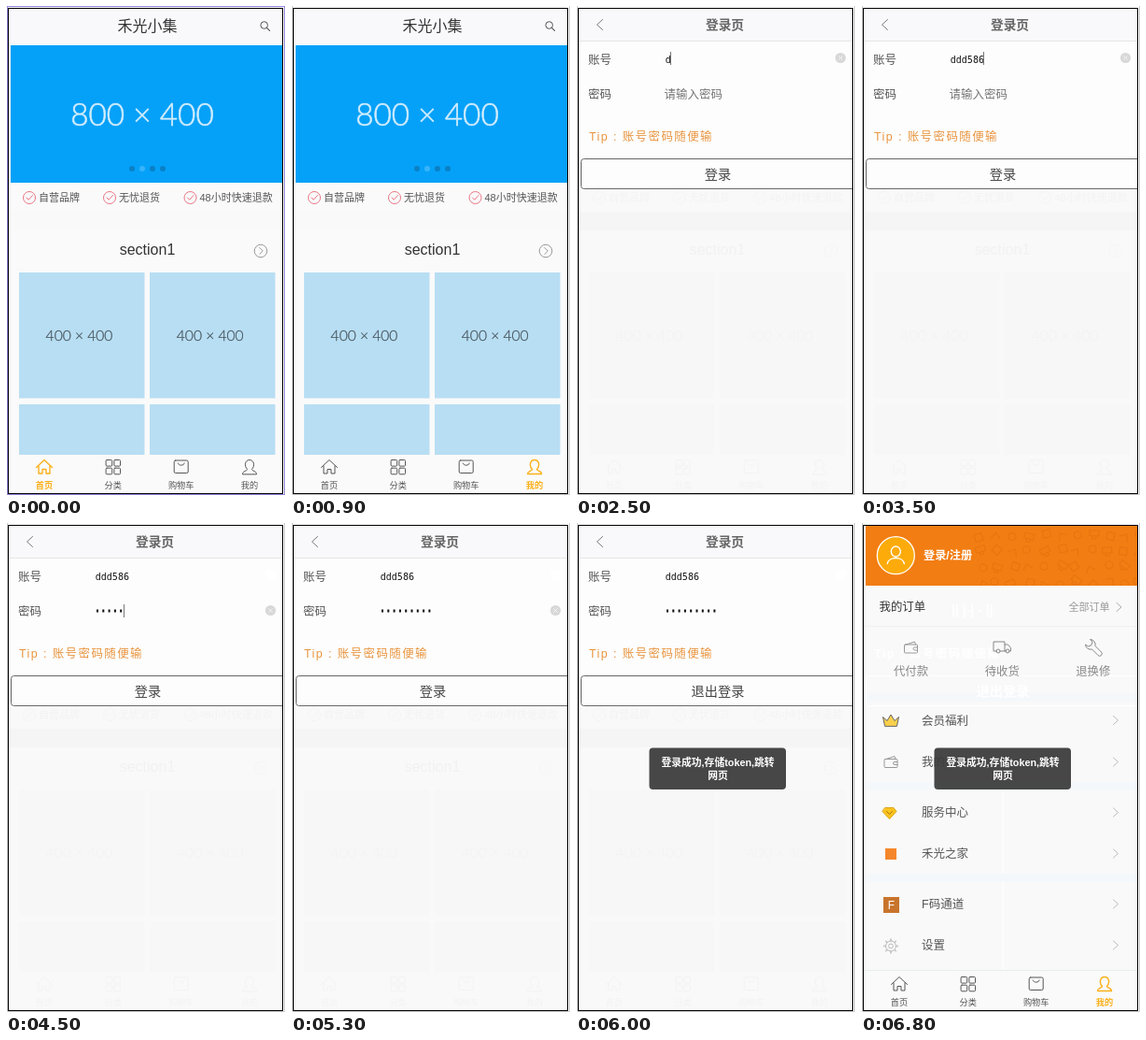
An HTML page for the animation above (8 s loop, 299 by 523 pixels).

```html
<!DOCTYPE html>
<html lang="zh-CN">
<head>
<meta charset="utf-8">
<title>商城登录</title>
<style>
html, body { margin: 0; width: 100%; height: 100%; overflow: hidden; background: #fff; }
svg { display: block; width: 299px; height: 523px; }
text { font-family: "Liberation Sans", "Noto Sans CJK SC", "Noto Sans CJK", sans-serif; white-space: pre; }
.mid { text-anchor: middle; }
.lato { font-family: Lato, sans-serif; font-weight: 300; }
.mono { font-family: "DejaVu Sans Mono", monospace; }
.bold { font-weight: 700; }
.line { fill: none; stroke-linecap: round; stroke-linejoin: round; }
</style>
</head>
<body>
<svg id="stage" viewBox="0 0 299 523" xmlns="http://www.w3.org/2000/svg">
  <defs>
    <clipPath id="screen"><rect x="3" y="3" width="294" height="519"/></clipPath>
    <clipPath id="lower"><rect x="3" y="197" width="294" height="325"/></clipPath>
    <clipPath id="top"><rect x="5" y="3" width="291" height="64"/></clipPath>
    <g id="homeGhost"></g>
    <g id="tabsGhost" color="#555"></g>
  </defs>
  <rect width="299" height="523" fill="#fff"/>
  <path d="M1.5 0V522.5H298.5V0" fill="none" stroke="#c8c8c8"/>
  <rect id="glow" x="1.5" y=".5" width="297" height="522" fill="none" stroke="#9186da"/>
  <g clip-path="url(#screen)">
    <g id="home"></g>
    <g id="login"></g>
    <g id="mine"></g>
    <g id="tabs"></g>
    <g id="toast"></g>
  </g>
  <rect x="2.5" y="2.5" width="294" height="519" fill="none" stroke="#000"/>
</svg>
<script>
const $ = id => document.getElementById(id);
const show = (id, on) => $(id).setAttribute('display', on ? 'inline' : 'none');

// y is the vertical middle of the line
const text = (x, y, size, color, str, cls = '', extra = '') =>
  `<text x="${x}" y="${y + size * 0.37}" font-size="${size}" fill="${color}" class="${cls}" ${extra}>${str}</text>`;
const rect = (x, y, w, h, fill, extra = '') =>
  `<rect x="${x}" y="${y}" width="${w}" height="${h}" fill="${fill}" ${extra}/>`;
const circle = (x, y, r, fill, extra = '') =>
  `<circle cx="${x}" cy="${y}" r="${r}" fill="${fill}" ${extra}/>`;
const path = (x, y, d, color, width = 1, extra = '') =>
  `<path transform="translate(${x} ${y})" d="${d}" class="line" stroke="${color}" stroke-width="${width}" ${extra}/>`;

const RIGHT = 'M-2.5 -4.5L2.5 0L-2.5 4.5';
const PERSON = 'M-7.5 7.5C-7.5 4 -2.5 4.5 -2.5 2.5C-6 -1 -5 -7.5 0 -7.5S6 -1 2.5 2.5C2.5 4.5 7.5 4 7.5 7.5Z';
const WALLET = 'M-6 -3H6Q7 -3 7 -2V5Q7 6 6 6H-6Q-7 6 -7 5V-2Q-7 -3 -6 -3ZM-5 -3L4 -6L5 -3M7 0H4A1.5 1.5 0 0 0 4 3H7';

function buildHome() {
  const check = (x, label) =>
    circle(x, 205, 6.5, 'none', 'stroke="#ea7583"') +
    path(x, 205, 'M-3 0L-0.8 2.3L3.5 -2.5', '#ea7583') +
    text(x + 10, 205, 11, '#555', label);
  const card = (x, y, h) => rect(x, y, 134.5, h, '#b8def3');
  const size = (x, y, px, color, str) =>
    text(x, y, px, color, str, 'lato mid', `stroke="${color}" stroke-width="${px * 0.018}"`);
  return rect(3, 3, 294, 519, '#fafafa') +
    rect(3, 3, 294, 38, '#f9f8fa') +
    text(151.5, 21, 16, '#333', '禾光小集', 'mid') +
    circle(276.7, 20.5, 3.8, 'none', 'stroke="#555"') +
    path(279.5, 23.3, 'M0 0L3 3', '#555', 1.2) +
    rect(5, 42, 291, 147, '#05a1f8') +
    size(146, 115.5, 33.4, '#d3edfd', '800 × 400') +
    [0, 1, 2, 3].map(i => circle(135 + 11 * i, 174, 3, i === 1 ? '#37b4fb' : '#0a80c6')).join('') +
    check(25, '自营品牌') + check(111, '无忧退货') + check(197.5, '48小时快速退款') +
    rect(3, 220, 294, 20, '#f9f9f9') +
    text(151.5, 260, 16, '#333', 'section1', 'mid') +
    circle(273, 262, 6.8, 'none', 'stroke="#999"') +
    path(273.5, 262, 'M-1.7 -3.5L1.8 0L-1.7 3.5', '#999') +
    card(14, 285, 134.5) + card(154, 285, 134.5) +
    size(78.5, 352.5, 15.6, '#46545d', '400 × 400') + size(218.7, 352.5, 15.6, '#46545d', '400 × 400') +
    card(14, 426, 54) + card(154, 426, 54);
}

function buildTabs(prefix) {
  const box = (x, y) => `M${x} ${y}h4.6q1 0 1 1v4.6q0 1 -1 1h-4.6q-1 0 -1 -1v-4.6q0 -1 1 -1Z`;
  const items = [
    ['首页', 41, 'M-8.5 0.5L0 -7.5L8.5 0.5M-6 -1V7H-2V2.5H2V7H6V-1'],
    ['分类', 114.7, box(-6.6, -7.5) + box(2.2, -7.5) + box(-6.6, 1.2) + box(2.2, 1.2)],
    ['购物车', 187.7, 'M-6 -7H6Q7.5 -7 7.5 -5.5V5Q7.5 6.5 6 6.5H-6Q-7.5 6.5 -7.5 5V-5.5Q-7.5 -7 -6 -7ZM-3.5 -4C-3 -1 3 -1 3.5 -4'],
    ['我的', 261, PERSON]
  ];
  return rect(3, 480, 294, 43, '#fafafa') +
    items.map(([label, x, d], i) => `<g id="${prefix}${i}">` +
      path(x, 493, d, 'currentColor') +
      text(x, 513, 9.2, 'currentColor', label, 'mid') + '</g>').join('');
}

function buildLogin() {
  const clear = (id, y) => `<g id="${id}">` + circle(283.5, y, 5.6, '#d8d8d8') +
    path(283.5, y, 'M-1.8 -1.8L1.8 1.8M1.8 -1.8L-1.8 1.8', '#f4f4f4') + '</g>';
  return rect(3, 3, 294, 519, '#f9f9f9') +
    '<g clip-path="url(#lower)" opacity=".03" style="filter:grayscale(1)">' +
    '<use href="#homeGhost"/><use href="#tabsGhost"/></g>' +
    rect(3, 220, 294, 20, '#f5f5f5') +
    rect(3, 38, 294, 159, '#fdfdfd') +
    rect(3, 3, 294, 34, '#f9f8fa') + rect(3, 37, 294, 1, '#e6e6e6') +
    path(25.5, 20, 'M3 -5.5L-3 0L3 5.5', '#777') +
    text(159.5, 20, 13.7, '#666', '登录页', 'mid bold') +
    text(13, 57, 12.5, '#555', '账号') + text(13, 94, 12.5, '#555', '密码') +
    text(94.5, 57, 12.5, '#757575', '请输入账号', '', 'id="userHint"') +
    text(94.5, 94, 12.5, '#757575', '请输入密码', '', 'id="passHint"') +
    text(95.8, 57.3, 10, '#111', '', 'mono', 'id="user"') +
    '<g id="dots"></g>' + rect(95, 49, 1, 14, '#777', 'id="caret"') +
    clear('clearUser', 55.5) + clear('clearPass', 93.5) +
    circle(284, 55.5, 6, '#fff', 'id="cleared"') +
    text(14, 139, 12.5, '#e8943e', 'Tip : 账号密码随便输', '', 'letter-spacing="1.4"') +
    rect(5.5, 163.5, 296, 32, '#fdfdfd', 'id="button" rx="3" stroke="#666"') +
    text(152, 180, 14.2, '#444', '登录', 'mid', 'id="action"');
}

function buildMine() {
  let seed = 7;
  const rnd = () => (seed = seed * 16807 % 2147483647) / 2147483647;
  const shapes = ['M-4 -4H4V4H-4Z', 'M-5 2L0 -4L5 2', 'M-4 0A4 4 0 1 0 4 0A4 4 0 1 0 -4 0', 'M-5 -3H5V3H-5ZM-2 3V6H2V3'];
  let pattern = '';
  for (let i = 0; i < 44; i++) {
    const x = 126 + (i % 11) * 17 + rnd() * 6, y = 10 + Math.floor(i / 11) * 17 + rnd() * 6;
    pattern += `<g transform="rotate(${Math.round(rnd() * 90 - 45)} ${x} ${y})">` +
      path(x, y, shapes[i % 4], '#dc6c0d', 1, 'opacity=".5"') + '</g>';
  }
  const order = (x, label, icon) => icon + text(x, 158.5, 12.4, '#888', label, 'mid');
  const row = (y, label, icon) => icon + text(65, y, 12.5, '#555', label) + path(273, y, RIGHT, '#bbb');
  const gap = y => rect(3, y, 294, 9, '#f4f8fb');
  const gear = Array.from({ length: 8 }, (_, i) => {
    const a = i * Math.PI / 4, c = Math.cos(a), s = Math.sin(a);
    return `M${c * 5.5} ${s * 5.5}L${c * 7.3} ${s * 7.3}`;
  }).join('');
  return rect(3, 3, 294, 519, '#f9f9f9') +
    rect(5, 3, 291, 64, '#f27d12') + `<g clip-path="url(#top)">${pattern}</g>` +
    circle(37.3, 34.7, 20, '#fcab0b', 'stroke="#fff" stroke-width="1.3"') +
    path(37.3, 34.5, 'M-9 9C-8 1 8 1 9 9M-5 -4A5 5.5 0 1 0 5 -4A5 5.5 0 1 0 -5 -4', '#fff', 1.4) +
    text(67, 34.5, 12.2, '#fff', '登录/注册', 'bold') +
    text(19.5, 89.5, 12.4, '#333', '我的订单') +
    text(222.5, 90, 11, '#999', '全部订单') + path(276.5, 90, RIGHT, '#aaa') +
    rect(3, 110, 294, 1, '#f0f0f0') +
    gap(182) + gap(277) + gap(375) +
    // faint remains of the login page underneath
    text(14, 139, 12.5, '#fff', 'Tip : 账号密码随便输', 'bold', 'letter-spacing="1.4"') +
    text(97, 93, 14, '#fff', '|| |-| - ||', 'bold') +
    rect(5.5, 163.5, 296, 32, 'none', 'rx="3" stroke="#fff"') +
    text(152, 180, 14.2, '#fff', '退出登录', 'mid bold') +
    order(53.5, '代付款', path(53.5, 133, WALLET, '#999')) +
    order(151.3, '待收货', path(151, 133, 'M-6 4H-9V-6H3V4H-2M3 -3H6.5L9.5 0.5V4H8M3 4H4M-6 4A2 2 0 1 0 -2 4A2 2 0 1 0 -6 4M4 4A2 2 0 1 0 8 4A2 2 0 1 0 4 4', '#888')) +
    order(248.8, '退换修', path(249, 133, 'M-3 -8.5A5.5 5.5 0 0 1 2 -1.5L8.5 5A2.4 2.4 0 0 1 5 8.5L-1.5 2A5.5 5.5 0 0 1 -8.5 -3L-5.5 -1L-2.2 -2.2L-1 -5.5Z', '#888')) +
    rect(151, 286, 2, 89, '#fdfdfd') + rect(151, 384, 2, 94, '#fdfdfd') +
    row(211, '会员福利', path(32, 211, 'M-6.5 6L-8.5 -3.5L-4 0.5L0 -6L4 0.5L8.5 -3.5L6.5 6Z', '#666', 1, 'style="fill:#f9d04c"')) +
    row(255.5, '我的优惠', path(32, 255.5, WALLET, '#999')) +
    row(309.5, '服务中心', path(30.5, 310, 'M-4.5 -5.5H4.5L7.5 -1.5L0 6.5L-7.5 -1.5Z', '#dba51c', 1, 'style="fill:#fbc31e"') +
      path(30.5, 310, 'M-3 -1.5L0 1.5L3 -1.5', '#a9750c')) +
    row(353.5, '禾光之家', rect(26, 348, 12, 12, '#f5872b')) +
    row(407.5, 'F码通道', rect(24, 400, 17, 17, '#c8742c') + text(32.5, 408.5, 12, '#fff', 'F', 'mid')) +
    row(451.5, '设置', path(32, 452.5, gear, '#ccc', 2) + circle(32, 452.5, 5.4, '#f9f9f9', 'stroke="#bbb"') +
      circle(32, 452.5, 2.4, 'none', 'stroke="#bbb"')) +
    rect(3, 478, 294, 1, '#e9edf0');
}

function buildToast() {
  return rect(78.5, 240.5, 146.5, 44.5, '#3c3c3c', 'rx="4" opacity=".94"') +
    text(152, 256, 10.8, '#fff', '登录成功,存储token,跳转', 'mid bold') +
    text(152, 270, 10.8, '#fff', '网页', 'mid bold');
}

$('home').innerHTML = $('homeGhost').innerHTML = buildHome();
$('tabs').innerHTML = buildTabs('tab');
$('tabsGhost').innerHTML = buildTabs('ghost');
$('mine').innerHTML = buildMine();
$('login').innerHTML = buildLogin();
$('toast').innerHTML = buildToast();

const LOOP = 8000;
const USER = 'ddd586';
const userKeys = [2500, 2700, 2800, 3000, 3300, 3500];
const passKeys = [4100, 4200, 4400, 4500, 4500, 4700, 4700, 4800, 4800];
const typed = (keys, t) => keys.filter(k => t >= k).length;

function drawForm(t) {
  const n = typed(userKeys, t), m = typed(passKeys, t);
  const inPass = t >= 3800;
  show('userHint', !n);
  show('passHint', !m);
  $('user').textContent = USER.slice(0, n);
  $('dots').innerHTML = Array.from({ length: m }, (_, i) => rect(97 + 6.3 * i, 92.5, 2, 3, '#111')).join('');
  show('clearUser', n && !inPass);
  show('cleared', inPass);
  show('clearPass', m && t < 5800);
  show('caret', t >= 2000 && t < 5300);
  $('caret').setAttribute('x', Math.round(inPass ? 95 + 6.25 * m : 95 + 6 * n));
  $('caret').setAttribute('y', inPass ? 87 : 49);
  const pressed = t >= 5800 && t < 5900;
  $('button').setAttribute('fill', pressed ? '#999' : '#fdfdfd');
  $('action').textContent = t >= 5800 ? '退出登录' : '登录';
}

function draw(t) {
  const page = t < 1300 ? 'home' : t < 6800 ? 'login' : 'mine';
  for (const id of ['home', 'login', 'mine']) show(id, id === page);
  show('glow', t < 800);
  show('tabs', page !== 'login');
  const active = t < 900 ? 0 : 3;
  for (let i = 0; i < 4; i++) {
    $('tab' + i).setAttribute('color', i === active ? '#fbb01b' : '#555');
    $('tab' + i).setAttribute('font-weight', i === active ? 700 : 400);
    $('tab' + i).firstChild.setAttribute('stroke-width', i === active ? 1.4 : 1);
  }
  if (page === 'login') drawForm(t);
  show('toast', t >= 5800);
  $('toast').setAttribute('opacity', t < 5900 ? 0.22 : t < 6000 ? 0.7 : 1);
}

const start = performance.now();
function tick() {
  draw((performance.now() - start) % LOOP);
  requestAnimationFrame(tick);
}
draw(0);
requestAnimationFrame(tick);
</script>
</body>
</html>
```
